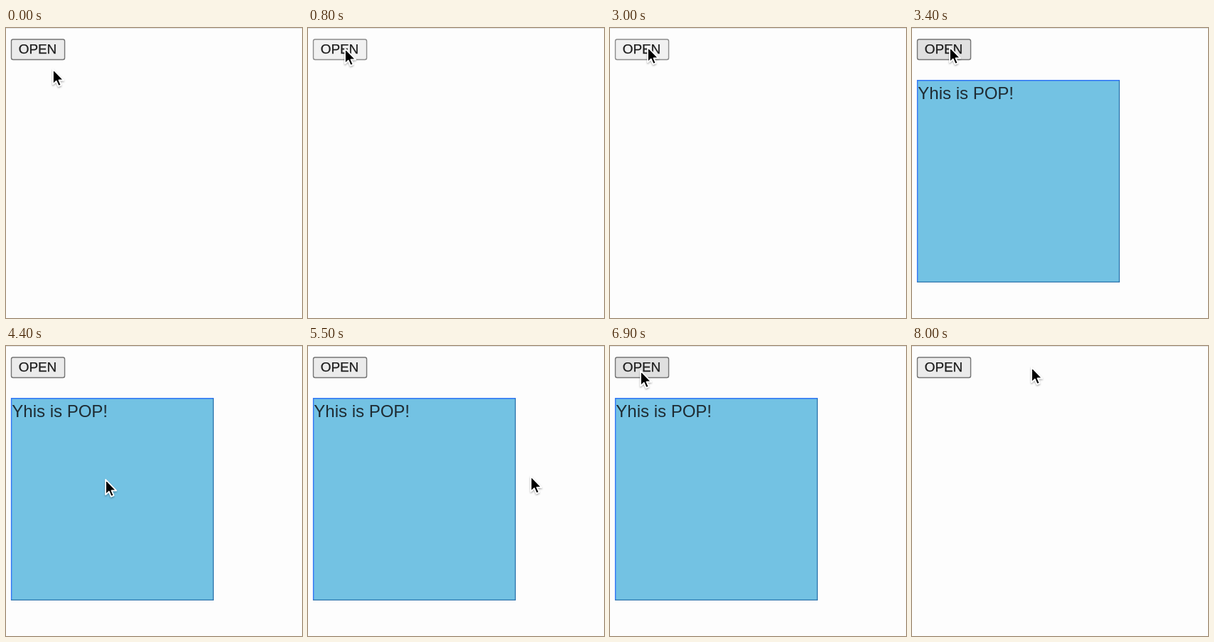
Animation of 416 by 408 pixels, one loop 8.1 s. Source, as an HTML page:

```html
<!DOCTYPE html>
<html lang="en">
<head>
<meta charset="utf-8">
<title>Popup demo</title>
<style>
  html, body { margin: 0; width: 100%; height: 100%; overflow: hidden; background: #fdfdfd; }
  svg { display: block; width: 416px; height: 408px; font-family: "Liberation Sans", Arial, sans-serif; }
  .soft { filter: blur(0.45px); }
</style>
</head>
<body>
<svg viewBox="0 0 416 408">
  <defs>
    <filter id="shadow" x="-50%" y="-50%" width="200%" height="200%">
      <feDropShadow dx="0" dy="1.5" stdDeviation="1.2" flood-opacity="0.35"/>
    </filter>
  </defs>
  <rect width="416" height="1" fill="#e2e2e2"/>
  <g class="soft">
    <rect id="button" x="7.5" y="16" width="75" height="28.5" rx="2.5" stroke-width="1.4"/>
    <text x="17.7" y="36" font-size="18.9" fill="#1c1c1c" stroke="#1c1c1c" stroke-width="0.25">OPEN</text>
  </g>
  <g id="popup">
    <rect x="7" y="73" width="285" height="285" fill="#73c2e3"/>
    <path d="M7.6 358V73.7H292" fill="none" stroke="#2f74f6" stroke-width="1.4"/>
    <path d="M291.4 74V357.4H7" fill="none" stroke="#2f75ad" stroke-width="1.3"/>
    <text class="soft" x="8.3" y="100.2" font-size="24" fill="#1f2c33">Yhis is POP!</text>
  </g>
  <g class="soft">
    <path id="cursor" d="M0 0V21.3L4.7 16.9L7.8 24L11.4 22.4L8.4 15.5H15Z" fill="#000"
          stroke="#fff" stroke-width="1.7" stroke-linejoin="round" filter="url(#shadow)"/>
  </g>
</svg>
<script>
const LOOP = 8100, STEP = 100;
const MOVE = 400, PAUSE = 300, PRESS = 100;  // each click: move there, pause, press
const button = document.getElementById("button");
const popup = document.getElementById("popup");
const cursor = document.getElementById("cursor");

const home = { x: 66, y: 58 };
const clicks = [
  { at: 800, x: 52, y: 29 },
  { at: 1900, x: 170, y: 43 },
  { at: 3000, x: 53, y: 27 },
  { at: 4600, x: 140, y: 188 },
  { at: 6000, x: 371, y: 182 },
  { at: 6800, x: 43, y: 35 },
  { at: 8000, x: 168, y: 30 }
];

const inside = (p, left, top, right, bottom) =>
  p.x > left && p.x < right && p.y > top && p.y < bottom;
const onButton = p => inside(p, 7, 15, 83, 45);
const onPopup = p => inside(p, 7, 73, 292, 358);
const easeOut = u => 1 - (1 - u) ** 2;

function tipAt(t) {
  const tip = { ...home };
  for (const { at, x, y } of clicks) {
    const progress = (t - at + PAUSE + MOVE) / MOVE;
    const u = easeOut(Math.min(1, Math.max(0, progress)));
    tip.x += (x - tip.x) * u;
    tip.y += (y - tip.y) * u;
  }
  return tip;
}

// The button opens the popup on release; a press outside closes it.
function stateAt(t) {
  let open = false, pressed = false;
  for (const click of clicks.filter(c => c.at <= t)) {
    pressed = onButton(click) && t < click.at + PRESS;
    open = onButton(click) ? !pressed : open && onPopup(click);
  }
  return { open, pressed };
}

function draw(now) {
  const t = Math.floor(now % LOOP / STEP) * STEP;
  const tip = tipAt(t);
  const { open, pressed } = stateAt(t);
  button.setAttribute("fill", pressed ? "#f1f1f1" : onButton(tip) ? "#e0e0e0" : "#ebebeb");
  button.setAttribute("stroke", pressed ? "#8c8c8c" : "#747474");
  popup.setAttribute("visibility", open ? "visible" : "hidden");
  cursor.setAttribute("transform", `translate(${tip.x} ${tip.y - 0.2})`);
}

const start = performance.now();
function tick() {
  draw(performance.now() - start);
  requestAnimationFrame(tick);
}
tick();
</script>
</body>
</html>
```
